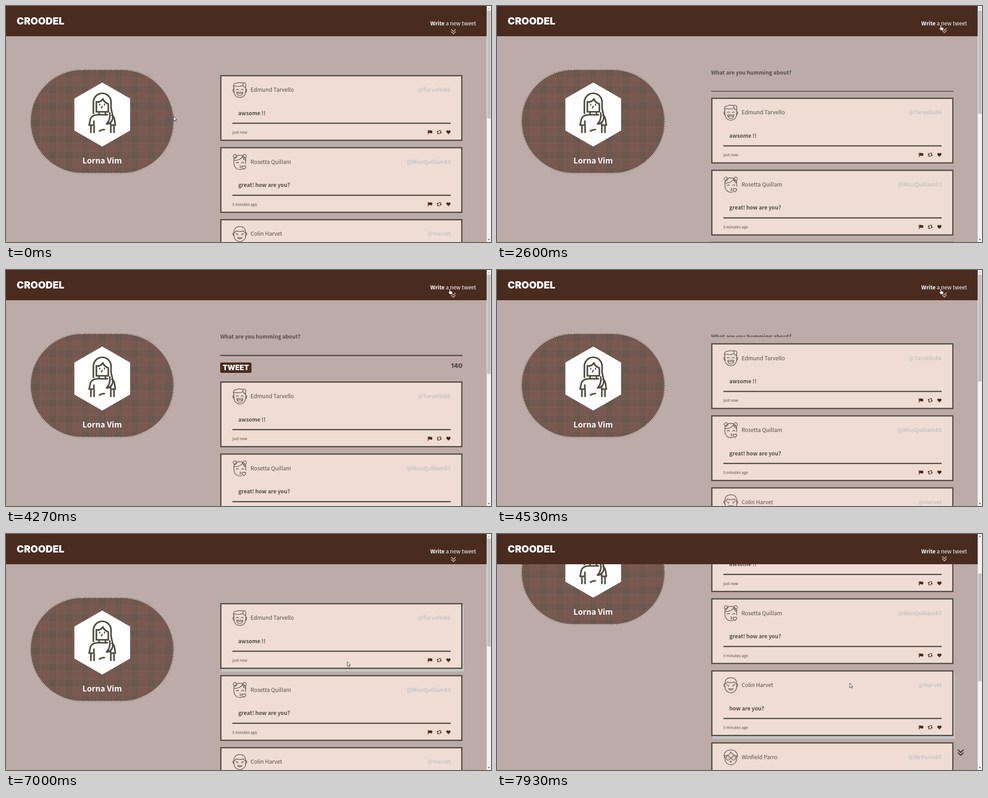
Recreate the animation shown at these times as an HTML page. Size 1071 px wide and 523 px high, loop 8000 ms.

```html
<!DOCTYPE html>
<html lang="en">
<head>
<meta charset="utf-8">
<title>Short message feed</title>
<style>
  html, body { margin: 0; width: 100%; height: 100%; overflow: hidden; background: #bcaba6; }
  svg { display: block; width: 100vw; height: 100vh; }
  text { font-family: "Noto Sans CJK JP", "Noto Sans CJK SC", "Noto Sans CJK KR", "Open Sans", sans-serif; font-size: 12.1px; fill: #534f45; white-space: pre; }
  .semi { font-size: 11.8px; font-weight: 600; }
  .small { font-size: 8.4px; }
  .handle { fill: #c8c5c4; }
  .block { font-family: Inter, "DejaVu Sans", sans-serif; font-weight: 900; }
  .light { fill: #fff; }
  .line { fill: none; stroke: #534f45; stroke-linecap: round; stroke-linejoin: round; }
  .face { stroke: #6b625a; stroke-width: 1.5; }
  .icon { fill: #4a2b20; }
</style>
</head>
<body>
<svg viewBox="0 0 1071 523" preserveAspectRatio="none">
  <defs>
    <pattern id="plaid" x="57" y="140" width="36.4" height="36.4" patternUnits="userSpaceOnUse">
      <rect width="37" height="37" fill="#6a574e"/>
      <path d="M18.2 0h18.2v36.4h-18.2z" fill="#84594f" opacity=".35"/>
      <path d="M0 18.2h36.4v18.2h-36.4z" fill="#84594f" opacity=".3"/>
      <path d="M0 .5h36.4M0 18.7h36.4M.5 0v36.4M18.7 0v36.4" stroke="#93786c" stroke-width=".8" opacity=".32"/>
    </pattern>
    <clipPath id="formClip"><rect id="formBox" x="470" y="139.5" width="542" height="0"/></clipPath>
    <g id="icons" class="icon">
      <path d="M931.5 122h1.4v9.6h-1.4zM933.2 122.8q2.2-1 4.2 0t3.8-.3v6q-2 1-4 .2t-4 .2z"/>
      <path d="M953.2 123.2l2.6 2.9h-1.7v3.1h3l1.4 1.5h-5.8v-4.6h-2.1zM960 129.9l-2.6-2.9h1.7v-3.1h-3l-1.4-1.5h5.8v4.6h2.1z"/>
      <path d="M977 131.2l-4-4.2c-2-2.4.8-6.300 4-3.300c3.200-3 6 .9 4 3.300z"/>
    </g>
    <path id="chevrons" d="M-4.400-4.300L0 .1 4.400-4.300M-4.400 .8L0 5.200 4.400 .8" fill="none" stroke-width="1.700" stroke-linecap="round" stroke-linejoin="round"/>
  </defs>

  <rect width="1071" height="523" fill="#bcaba6"/>

  <g id="page">
    <rect x="54" y="141" width="316.500" height="229.500" rx="114.700" fill="url(#plaid)" stroke="#6a574e" stroke-width="2"/>
    <rect x="54" y="141" width="316.500" height="229.500" rx="114.700" fill="none" stroke="#fff" stroke-width="2" stroke-linecap="round" stroke-dasharray="0 3.900"/>
    <path d="M212.500 169.500L274 205V276L212.500 311.500 151 276V205z" fill="#fff"/>
    <g class="line" stroke-width="3.600">
      <path d="M193 238V213A19.500 19.500 0 0 1 232 213V226C233 238 239 244 234 254Q230 261 222 261.500Q231 252 229 237"/>
      <path d="M199.500 212V234.500H226V218M199.500 213Q210 213 214 206Q217 214 226 217"/>
      <path d="M205.500 235V240M219.500 235V240M224 241H202Q189 242 186.500 250L183.500 264H194V255M234 242.500Q238.500 245 239.500 251L241.500 264H231V257"/>
      <path d="M187.500 265V281.500M194.500 265V281.500M231.500 265V281.500M238.500 265V281.500M205.500 278Q210 273.500 218.500 274" stroke-linecap="butt"/>
      <path d="M207 217.500V219.500M217.500 217.500V219.500M212.500 222L210.800 226" stroke-width="2.600"/>
    </g>
    <text class="semi light" x="212.300" y="349" text-anchor="middle" style="font-size:17.500px">Lorna Vim</text>

    <g clip-path="url(#formClip)">
      <text class="semi" x="473" y="152">What are you humming about?</text>
      <rect x="473" y="188" width="535" height="2.700" fill="#534f45"/>
      <rect x="473" y="205" width="69" height="23" rx="3" fill="#4a2b20"/>
      <text class="block light" x="507.500" y="221.700" text-anchor="middle" style="font-size:15.800px">TWEET</text>
      <text class="block" x="1008" y="217" text-anchor="end" style="font-size:13.500px">140</text>
    </g>
    <g id="feed"></g>
  </g>

  <use id="toTop" href="#chevrons" x="1024" y="484" stroke="#4a2b20" transform="translate(1024 484) scale(1.250) translate(-1024 -484)"/>

  <rect width="1062" height="67" fill="#4a2b20"/>
  <text class="block light" x="23.500" y="41" style="font-size:21.600px">CROODEL</text>
  <text class="light" x="1038" y="43" text-anchor="end" style="font-size:11.900px"><tspan font-weight="600">Write</tspan> a new tweet</text>
  <use id="hint" href="#chevrons" stroke="#c6b7b1"/>

  <rect x="1061.500" width="9.500" height="523" fill="#f1f1f1"/>
  <rect id="thumb" x="1062.500" y="10" width="7.700" height="239" fill="#c1c1c1"/>
  <path id="upArrow" d="M1063.900 6.500h4.800l-2.400-2.800z"/>
  <path d="M1063.900 516.500h4.800l-2.400 2.800z" fill="#505050"/>

  <g id="cursor" fill="#fff" stroke="#111" stroke-width=".8" stroke-linejoin="round">
    <path id="arrow" d="M0 .5V10.700L2.400 8.500 3.900 11.900 5.500 11.200 4.100 7.900H7.200z"/>
    <path id="hand" d="M-1.200 1.200a1.200 1.200 0 0 1 2.400 0V4.800L4.800 5.600Q6.300 6 6 7.800L5 12H0L-3.600 7.600Q-3.200 5.900-1.200 7.300z"/>
  </g>
</svg>

<script>
const LOOP = 8000, CARD_TOP = 153, CARD_H = 146, PITCH = 159.6, FORM_H = 99.5;
const $ = id => document.getElementById(id);

const faces = [
  `<path d="M-13-6V3C-13 12-6 17 0 17S13 12 13 3V-8M-13-2Q-16-2-15 2T-12 5M13-2Q16-2 15 2T12 5"/>
   <path d="M-13-4C-16-11-13-15-7-15Q-3-17 2-16H10Q15-15 12.500-8M-14-9Q4-6 7-11V-16M7-10Q9-6 13-5"/>
   <path d="M-8 0Q-5.500-3-3 0M3 0Q5.500-3 8 0M-7 5H7Q6 13 0 13T-7 5zM-6 8H6"/>`,
  `<circle cx="-10.500" cy="-12.500" r="4"/><circle cx="10.500" cy="-12.500" r="4"/>
   <path d="M-13-7V3C-13 12-6 17 0 17Q3 17 5 15.500M13-7V4M-13-4Q-11-15 0-15T13-4M-13-3Q2-4 6-12Q8-5 13-3"/>
   <path d="M-8 2Q-5.500-.5-3 2M4 2Q6.500-.5 9 2M0 8Q3 9 1 10.500Q3 12 0 13M9 16.500L5 12.500Q4 9 7 8.700L9 10 11 8.700Q14 9 13 12.500z"/>`,
  `<path d="M-13-4V3C-13 12-6 17 0 17S13 12 13 3V-4Q12-16.500 0-16.500T-13-4zM-13-3Q-16-3-15 2L-12 5M13-3Q16-3 15 2L12 5"/>
   <path d="M-13-3Q-9-4-8-7Q0-4 8-7Q9-4 13-3M-9-1L-4 .5M9-1L4 .5M-6 3H-5M5 3H6M-5 8H5Q3 11 0 11T-5 8"/>`,
  `<path d="M-13-3V3C-13 12-6 17 0 17S13 12 13 3V-3M-14 1C-17-10-9-16 0-16S17-10 14 1M-13-3Q-2-4 0-12Q4-4 13-3"/>
   <circle cx="-6" cy="2" r="4.500"/><circle cx="6" cy="2" r="4.500"/><path d="M-1.500 2H1.500M-6 2H-5M5 2H6M-2 10Q0 8 2 10Q0 13-2 10"/>`
];

const posts = [
  ["Edmund Tarvello", "@Tarvello86", "awsome !!", "just now"],
  ["Rosetta Quillam", "@MissQuillam83", "great! how are you?", "5 minutes ago"],
  ["Colin Harvet", "@Harvet", "how are you?", "5 minutes ago"],
  ["Winfield Parro", "@MrParro80", "hello", "5 minutes ago"]
];

$("feed").innerHTML = posts.map(([name, handle, body, age], i) => `
  <g transform="translate(0 ${CARD_TOP + i * PITCH})">
    <rect class="shade" x="476" y="6" width="535" height="${CARD_H}" fill="#c3c6c4"/>
    <rect x="474.400" y="1.400" width="532.200" height="${CARD_H - 2.8}" fill="#efdcd4" stroke="#534f45" stroke-width="2.800"/>
    <g class="line face" transform="translate(516.300 33)">${faces[i]}</g>
    <text x="540" y="37.300">${name}</text>
    <text class="semi handle" x="982" y="37.300" text-anchor="end">${handle}</text>
    <text class="semi" x="513" y="88.700">${body}</text>
    <rect x="500" y="105.500" width="482" height="2.700" fill="#534f45"/>
    <text class="small" x="499.700" y="130.200">${age}</text>
    <use href="#icons"/>
  </g>`).join("");
const shades = [...document.querySelectorAll(".shade")];

// Rows are [time, value, value...]; values between rows are interpolated.
const pointer = [
  [70, 370, 244], [870, 760, 215], [1300, 900, 150], [1730, 961, 49], [2050, 980, 42],
  [4700, 980, 42], [5200, 965, 90], [5900, 860, 185], [6100, 800, 205], [6600, 728, 245],
  [6930, 742, 261], [7000, 753.5, 282.5], [7250, 779, 330]
];
const scrolling = [[7400, 0], [7670, 97], [7930, 170], [8000, 187]];

function track(keys, t) {
  const next = keys.findIndex(k => k[0] > t);
  if (next === 0) return keys[0].slice(1);
  if (next < 0) return keys[keys.length - 1].slice(1);
  const a = keys[next - 1], b = keys[next], p = (t - a[0]) / (b[0] - a[0]);
  return a.slice(1).map((v, i) => v + (b[i + 1] - v) * p);
}

function swing(t, start, length) {
  const p = Math.min(1, Math.max(0, (t - start) / length));
  return 0.5 - Math.cos(p * Math.PI) / 2;
}

const show = (el, on) => el.setAttribute("visibility", on ? "visible" : "hidden");
const move = (el, x, y) => el.setAttribute("transform", `translate(${x} ${y})`);

function draw(t) {
  const [x, y] = track(pointer, t);
  const [scroll] = track(scrolling, t);
  const open = FORM_H * (swing(t, 2400, 400) - swing(t, 4210, 400));

  move($("page"), 0, -scroll);
  move($("feed"), 0, open);
  $("formBox").setAttribute("height", open);

  shades.forEach((shade, i) => {
    const top = CARD_TOP + i * PITCH + open - scroll;
    show(shade, y > 67 && x > 473 && x < 1008 && y >= top && y <= top + CARD_H);
  });

  move($("hint"), 988, 55.4 - 1.6 * Math.cos((t - 3215) / 600 * 2 * Math.PI));
  show($("toTop"), scroll > 110);
  $("thumb").setAttribute("y", 10 + scroll * 0.456);
  $("thumb").setAttribute("height", 239 - open * 0.2);
  $("upArrow").setAttribute("fill", scroll > 0 ? "#505050" : "#a3a3a3");

  const onLink = y < 46;
  move($("cursor"), x, y);
  show($("arrow"), !onLink);
  show($("hand"), onLink);
}

const begin = performance.now();
function frame() {
  draw((performance.now() - begin) % LOOP);
  requestAnimationFrame(frame);
}
frame();
</script>
</body>
</html>
```
